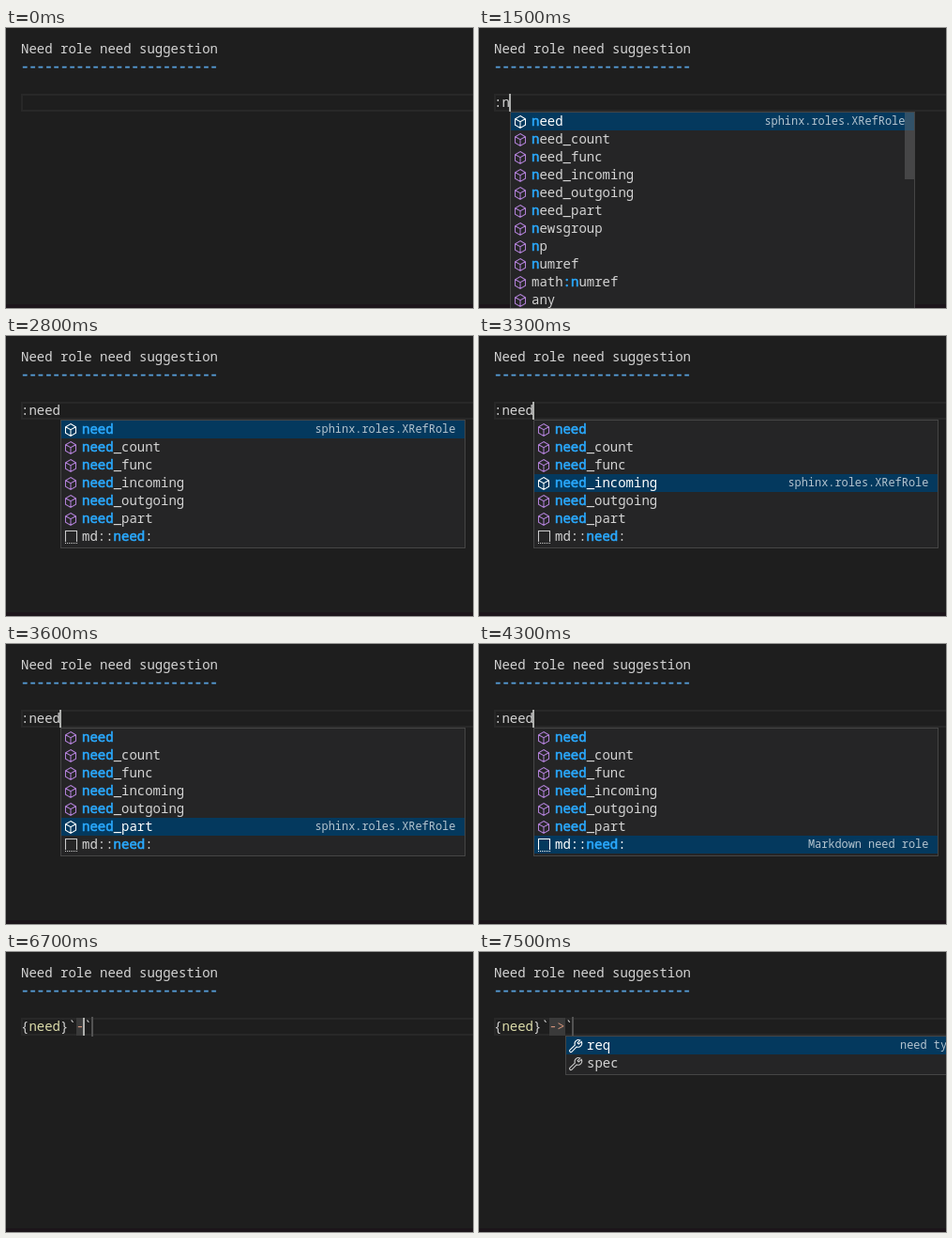
Recreate the animation shown at these times as an HTML page. Size 498 by 298 pixels, loop 8000 ms.

```html
<!DOCTYPE html>
<html lang="en">
<head>
<meta charset="utf-8">
<title>Role suggestions</title>
<style>
  html, body { margin: 0; width: 100%; height: 100%; overflow: hidden; background: #1e1e1e; }
  svg { display: block; }
  text { font: 14px "Noto Sans Mono", monospace; white-space: pre; fill: #d4d4d4; }
  .detail { font-size: 11.9px; fill: #fff; fill-opacity: .7; text-anchor: end; }
  .hit { fill: #2aaaff; stroke: #2aaaff; stroke-width: .57px; }
  .rule { fill: #569cd6; stroke: #569cd6; stroke-width: .57px; }
  .name { fill: #dcdcaa; }
  .value { fill: #ce9178; }
  .on { fill: #fff; }
  .icon { fill: none; stroke: currentColor; stroke-width: 1.05; }
</style>
</head>
<body>
<svg id="stage" width="498" height="298" viewBox="0 0 498 298">
  <defs>
    <path id="method" d="M8 1.5 13.5 4.7V11.1L8 14.4 2.5 11.1V4.7ZM2.6 4.8 8 7.7 13.4 4.8M8 7.7V14.2"/>
    <g id="snippet">
      <path d="M2.5 13V1.5H14.5V13"/>
      <path d="M2 14.5H15" stroke-dasharray="1 1"/>
    </g>
    <path id="property" d="M12.8 2A4 4 0 0 0 7.3 7L1.8 12.4A1.4 1.4 0 0 0 3.8 14.3L9.2 8.9A4 4 0 0 0 14.2 3.3L11.3 6.1 10 4.8Z"/>
  </defs>
  <rect width="498" height="298" fill="#1e1e1e"/>
  <rect y="294" width="498" height="4" fill="#1c151a"/>
  <text x="16" y="27">Need role need suggestion</text>
  <text x="16" y="46" class="rule">-------------------------</text>
  <g id="editor"></g>
</svg>
<script>
const LOOP = 8000, LEFT = 16, CHAR = 8.4, ROW = 19, LINE_TOP = 70, WIDTH = 432;
const editor = document.getElementById('editor');

const needs = ['need', 'need_count', 'need_func', 'need_incoming', 'need_outgoing', 'need_part'];
const lists = {
  all: ['abbr', 'any', 'c:data', 'c:enum', 'c:enumerator', 'c:expr', 'c:func', 'c:macro', 'c:member', 'c:struct', 'c:type'],
  n: [...needs, 'newsgroup', 'np', 'numref', 'math:numref', 'any'],
  ne: [...needs, 'newsgroup', 'numref', 'math:numref', 'md::need:', 'menuselection'],
  need: [...needs, 'md::need:'],
  types: ['req', 'spec']
};

// Each entry changes part of the state from its time on.
const events = [
  [0, { text: '', col: 0, cursor: false, list: null, query: '', sel: 0, slider: 0, bulb: false }],
  [500, { cursor: true }],
  [1000, { cursor: false }],
  [1100, { cursor: true, text: ':', col: 1 }],
  [1200, { list: 'all', slider: 40 }],
  [1500, { text: ':n', col: 2, list: 'n', query: 'n', slider: 71 }],
  [1900, { text: ':ne', col: 3, list: 'ne', query: 'ne', slider: 160 }],
  [2100, { text: ':nee', col: 4, query: 'nee' }],
  [2300, { text: ':need', col: 5, list: 'need', query: 'need', slider: 0 }],
  [2800, { cursor: false }],
  [3000, { sel: 1 }],
  [3100, { sel: 2 }],
  [3300, { sel: 3, cursor: true }],
  [3400, { sel: 4 }],
  [3600, { sel: 5 }],
  [3800, { cursor: false }],
  [3900, { sel: 6 }],
  [4300, { cursor: true }],
  [4700, { text: 'ID', col: 9, list: null, sel: 0, query: '', placeholder: true, selected: true }],
  [4900, { bulb: true }],
  [5100, { cursor: false }],
  [5600, { cursor: true }],
  [6100, { cursor: false }],
  [6400, { text: '-', col: 8, cursor: true, selected: false }],
  [6700, { bulb: false }],
  [6900, { cursor: false }],
  [7000, { text: '->', col: 9, cursor: true }],
  [7100, { list: 'types' }],
  [7500, { cursor: false }]
];

const escape = s => s.replace(/&/g, '&amp;').replace(/</g, '&lt;').replace(/>/g, '&gt;');
const rect = (x, y, w, h, fill) => `<rect x="${x}" y="${y}" width="${w}" height="${h}" fill="${fill}"/>`;
const text = (x, y, body, cls = '') => `<text x="${x}" y="${y}" class="${cls}">${body}</text>`;
const span = (cls, body) => `<tspan class="${cls}">${body}</tspan>`;

function highlight(label, query) {
  if (!query) return label;
  const isSnippet = label.startsWith('md');
  let start = label[0] === query[0] ? 0 : label.indexOf(':' + query[0]);
  if (start < 0) return label;
  let wanted = query;
  if (start > 0) {
    if (isSnippet) start++;
    else wanted = ':' + query;
  }
  let next = 0, out = label.slice(0, start);
  for (const ch of label.slice(start)) {
    const hit = ch === wanted[next];
    if (hit) next++;
    out += hit ? span('hit', ch) : ch;
  }
  return out;
}

function detailOf(label) {
  if (label === 'req') return 'need type';
  if (label === 'abbr') return 'sphinx.roles.Abbreviation';
  return label.startsWith('md') ? 'Markdown need role' : 'sphinx.roles.XRefRole';
}

function popup({ list, query, sel, slider, col }) {
  const items = lists[list];
  const x = Math.round(LEFT + CHAR * col), top = LINE_TOP + ROW + 1;
  const height = slider ? 12 * ROW : items.length * ROW + 2;
  let out = rect(x, top - 1, WIDTH, height + 2, '#454545') + rect(x + 1, top, WIDTH - 2, height, '#252526');
  items.forEach((label, i) => {
    const y = top + i * ROW, on = i === sel;
    const kind = list === 'types' ? 'property' : label.startsWith('md') ? 'snippet' : 'method';
    const color = on ? '#fff' : kind === 'method' ? '#b180d7' : '#ccc';
    if (on) {
      out += rect(x + 1, y, WIDTH - 2, ROW, '#04395e');
      out += text(x + WIDTH - 10.7, y + 13, detailOf(label), 'detail');
    }
    out += `<use href="#${kind}" class="icon" color="${color}" transform="translate(${x + 3} ${y + 2})"/>`;
    out += text(x + 23, y + 14, highlight(label, query), on ? 'on' : '');
  });
  if (slider) out += rect(x + WIDTH - 11, top, 10, slider, 'rgba(121,121,121,.4)');
  return out;
}

function bulb() {
  return '<path d="M22 62V60.3A4.4 4.4 0 1 1 27 60.3V62Z" fill="#fc0"/>' +
    '<path d="M22.5 61.5H26.5V64.5H22.5Z" fill="none" stroke="#fc0"/>';
}

function line(state) {
  const baseline = LINE_TOP + 14;
  let out = '';
  if (!state.selected)
    out += `<rect x="17" y="${LINE_TOP + 1}" width="500" height="${ROW - 2}" fill="none" stroke="#282828" stroke-width="2"/>`;
  if (!state.placeholder) return out + text(LEFT, baseline, state.text);

  const from = 75, to = Math.round(LEFT + CHAR * state.col);
  const tabstop = Math.round(LEFT + CHAR * (state.col + 1)) - 1;
  out += rect(from, LINE_TOP, to - from, ROW, state.selected ? '#405c79' : '#3a3a3a');
  out += rect(tabstop, LINE_TOP - 1, 2, ROW + 2, '#525252');
  return out + text(LEFT, baseline,
    '{' + span('name', 'need') + '}`' + span('value', escape(state.text)) + '`');
}

function render(state) {
  let out = line(state);
  if (state.bulb) out += bulb();
  if (state.list) out += popup(state);
  if (state.cursor) {
    const x = Math.max(LEFT, Math.floor(LEFT - .3 + CHAR * state.col));
    out += rect(x, LINE_TOP, 2, ROW, '#aeafad');
  }
  editor.innerHTML = out;
}

let shown = -1;
function tick() {
  const t = performance.now() % LOOP;
  const past = events.filter(([at]) => at <= t);
  if (past.length !== shown) {
    shown = past.length;
    render(Object.assign({}, ...past.map(([, patch]) => patch)));
  }
  requestAnimationFrame(tick);
}
tick();
</script>
</body>
</html>
```
